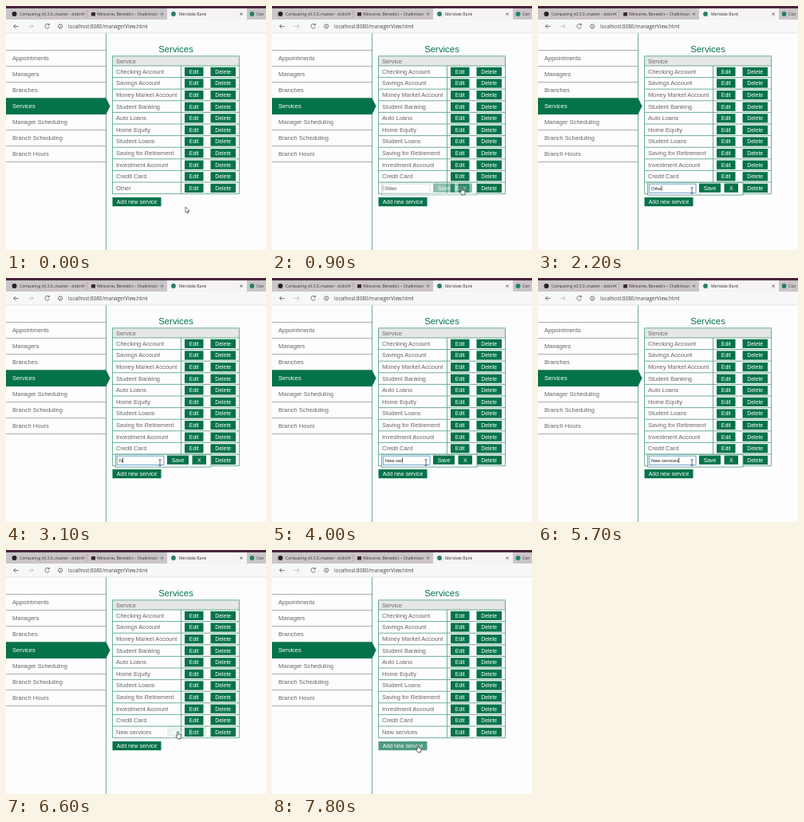
Write an HTML page that moves like this. It is 326x306 px and loops after 8000 ms.

```html
<!DOCTYPE html>
<html lang="en">
<head>
<meta charset="utf-8">
<title>Services</title>
<style>
html, body { margin: 0; width: 100%; height: 100%; overflow: hidden; background: #fdfdfd; }
svg { display: block; width: 326px; height: 306px; }
text { font: 7.5px "Liberation Sans", Arial, sans-serif; fill: #666; white-space: pre; }
.tab { font: 5.1px "Open Sans", sans-serif; fill: #333; }
.url { font: 6.3px "Open Sans", sans-serif; fill: #444; }
.title { font-size: 11.4px; fill: #05734a; text-anchor: middle; }
.btn rect { fill: #05734a; }
.btn text { font-size: 6.9px; fill: #fff; text-anchor: middle; }
.hover { opacity: .7; }
.line { stroke: #5fa58c; stroke-width: .9; fill: none; }
.icon { stroke: #555; stroke-width: .8; fill: none; }
#typed { font-size: 5.75px; fill: #222; }
</style>
</head>
<body>
<svg id="stage" viewBox="0 0 326 306"></svg>
<script>
const LOOP = 8000, ROW = 14.6, TOP = 75;
const rect = (x, y, w, h, fill, extra = '') =>
  `<rect x="${x}" y="${y}" width="${w}" height="${h}" fill="${fill}" ${extra}/>`;
const text = (x, y, s, cls = '', id = '') => `<text x="${x}" y="${y}" class="${cls}" id="${id}">${s}</text>`;
const path = (d, cls = 'line') => `<path d="${d}" class="${cls}"/>`;
const dot = (x, y, r, fill) => `<circle cx="${x}" cy="${y}" r="${r}" fill="${fill}"/>`;
const button = (x, y, w, label, id = '') =>
  `<g class="btn" id="${id}">${rect(x, y, w, 11.2, '')}${text(x + w / 2, y + 8, label)}</g>`;
const cross = (x, y) => path(`M${x - 1.6} ${y - 1.6}l3.2 3.2m0 -3.2l-3.2 3.2`, 'icon');

function browser() {
  return rect(0, 0, 326, 18, '#cbc5c9') + rect(0, 0, 326, 3, '#4b2439') +
    rect(202, 3, 100, 15, '#f5f3f4') + rect(0, 17, 326, 17, '#f7f7f7') +
    rect(0, 33.5, 326, .7, '#dcdcdc') + rect(101.5, 5, .6, 10, '#a49ca1') +
    dot(10.5, 10, 3, '#222') + text(17, 12, 'Comparing v0.3.0..master - dobri', 'tab') + cross(97, 10) +
    rect(107, 8, 5, 4.5, '#3a2a2a') + text(114, 12, 'Welcome, Benedict – Chalkmoor', 'tab') + cross(195.5, 10) +
    dot(210, 10, 2.9, '#25806a') + text(217, 12, 'Meridale Bank', 'tab') + cross(295, 10) +
    dot(308.5, 10, 2.9, '#25806a') + text(314, 12, 'Con', 'tab') +
    path('M15.5 25.5h-6m2.6-2.6l-2.6 2.6l2.6 2.6', 'icon') +
    `<g opacity=".35">${path('M28 25.5h6m-2.6-2.6l2.6 2.6l-2.6 2.6', 'icon')}</g>` +
    path('M54 23.6a2.8 2.8 0 1 0 .4 2.6M54.3 22v2h-2', 'icon') +
    path('M65.5 25.5a2.6 2.6 0 1 0 5.2 0a2.6 2.6 0 1 0 -5.2 0M68.1 25v2M68.1 23.8v.6', 'icon') +
    text(78, 28, 'localhost:8080/managerView.html', 'url');
}

function sidebar() {
  const items = ['Appointments', 'Managers', 'Branches', 'Services',
    'Manager Scheduling', 'Branch Scheduling', 'Branch Hours'];
  let s = path('M125.5 34V306');
  for (let i = 0; i <= items.length; i++) s += rect(0, 55 + 20 * i, 125, .8, '#999');
  s += '<path d="M0 115.5H125.5L130.5 125.5L125.5 136H0Z" fill="#05734a"/>';
  items.forEach((name, i) => {
    s += text(8, 68 + 20 * i, name).replace('>', i == 3 ? ' style="fill:#fff">' : '>');
  });
  return s;
}

function table() {
  const names = ['Checking Account', 'Savings Account', 'Money Market Account', 'Student Banking',
    'Auto Loans', 'Home Equity', 'Student Loans', 'Saving for Retirement',
    'Investment Account', 'Credit Card', 'Other'];
  const bottom = TOP + ROW * names.length;
  let s = text(213, 58, 'Services', 'title') + rect(133.5, 62.8, 159, 12.2, '#e6e6e6') +
    text(138, 71.7, 'Service') + path(`M133.5 62.8H292.5V${bottom}H133.5ZM219.5 ${TOP}V${bottom}`);
  names.forEach((name, i) => {
    const y = TOP + ROW * i;
    s += path(`M133.5 ${y}H292.5`) + text(138, y + 9.8, name, '', i == 10 ? 'last' : '') +
      button(224, y + 1.8, 23.5, 'Edit', i == 10 ? 'edit' : '') + button(256.5, y + 1.8, 31.5, 'Delete');
  });
  return s + button(133.5, 240, 61, 'Add new service', 'add');
}

const editor = () => '<g id="editor">' +
  rect(137.5, 221.3, 119.5, 15.8, '#fdfdfd', 'class="line" style="fill:#fdfdfd"') +
  rect(139.3, 223.2, 58.7, 11.2, '#fff', 'id="field" stroke-width=".9"') +
  text(142, 230.8, '', '', 'typed') + rect(0, 225.3, .7, 6.6, '#111', 'id="caret"') +
  button(202, 222.6, 27, 'Save', 'save') + button(233.5, 222.6, 17.5, 'X') + '</g>';

const shapes = {
  arrow: '<path d="M0 0V7.2L1.7 5.7L2.8 8.1L3.9 7.6L2.8 5.3H5Z" fill="#fff" stroke="#222" stroke-width=".6"/>',
  hand: '<path d="M-.8 .6Q0 -.5 .8 .6V3.6L3.4 4.2Q4.3 4.5 4.2 5.4L3.6 9.2H-.2L-2.4 6Q-2.4 4.8 -.8 5.6Z" fill="#fff" stroke="#222" stroke-width=".7"/>',
  beam: '<path d="M-1.5 -3.6H1.5M0 -3.6V3.6M-1.5 3.6H1.5" stroke="#222" stroke-width=".7"/>'
};

stage.innerHTML = browser() + sidebar() + table() + editor() +
  '<g id="pointer">' + Object.keys(shapes).map(k => `<g id="${k}">${shapes[k]}</g>`).join('') + '</g>';
const $ = id => document.getElementById(id);
const show = (id, on) => $(id).style.display = on ? '' : 'none';

// [time, field content]
const keys = [[0, 'Other'], [1950, 'Other'], [2200, 'Othe'], [2400, 'Oth'], [2500, 'Ot'], [2600, 'O'],
  [2700, ''], [3100, 'N'], [3200, 'Ne'], [3300, 'New'], [3600, 'New '], [3800, 'New s'], [3900, 'New se'],
  [4000, 'New ser'], [4200, 'New serv'], [4400, 'New servi'], [4500, 'New servic'], [4550, 'New service'],
  [4600, 'New services']];
// start, end, target x, y and optional bend point
const moves = [[50, 650, 238, 227.5], [1150, 1900, 193, 231.5], [5750, 6000, 215.5, 227.5],
  [6950, 7050, 211, 229], [7350, 7800, 183, 244.5, 238, 242]];

const ramp = (t, a, b) => Math.min(1, Math.max(0, (t - a) / (b - a)));
const ease = k => k * k * (3 - 2 * k);

function position(t) {
  let x = 225, y = 252;
  for (const [a, b, tx, ty, bx = (x + tx) / 2, by = (y + ty) / 2] of moves) {
    const k = ease(ramp(t, a, b)), j = 1 - k;
    x = j * j * x + 2 * j * k * bx + k * k * tx;
    y = j * j * y + 2 * j * k * by + k * k * ty;
  }
  return [x, y];
}

function draw(t) {
  const [x, y] = position(t);
  const open = ramp(t, 700, 1150) * (1 - ramp(t, 6150, 6650));
  const over = (l, r, top, bottom) => x > l && x < r && y > top && y < bottom;
  const hover = {
    edit: t < 1150 && over(224, 247.5, 222, 234),
    save: t > 1150 && t < 7000 && over(202, 229, 222, 234),
    add: over(133, 194.5, 240, 251)
  };
  for (const id in hover) $(id).classList.toggle('hover', hover[id]);

  const [last, value] = keys.filter(k => k[0] <= t).pop();
  const focused = t >= 1950 && t < 6000;
  $('typed').textContent = value;
  $('caret').setAttribute('x', 142.2 + (value ? $('typed').getComputedTextLength() : 0));
  show('caret', focused && (t - last) % 1100 < 500);
  $('field').setAttribute('stroke', focused ? '#5b9bd5' : '#bbb');
  $('last').textContent = t < 6150 ? 'Other' : 'New services';
  show('editor', open > 0);
  $('editor').style.opacity = open;

  const onButton = hover.edit || hover.save || hover.add || (t > 700 && t < 1300 && x > 229);
  const kind = onButton ? 'hand' : open > 0 && x < 199 ? 'beam' : 'arrow';
  for (const k in shapes) show(k, k == kind);
  $('pointer').setAttribute('transform', `translate(${x} ${y})`);
}

const start = performance.now();
function frame() {
  draw((performance.now() - start) % LOOP);
  requestAnimationFrame(frame);
}
frame();
</script>
</body>
</html>
```
